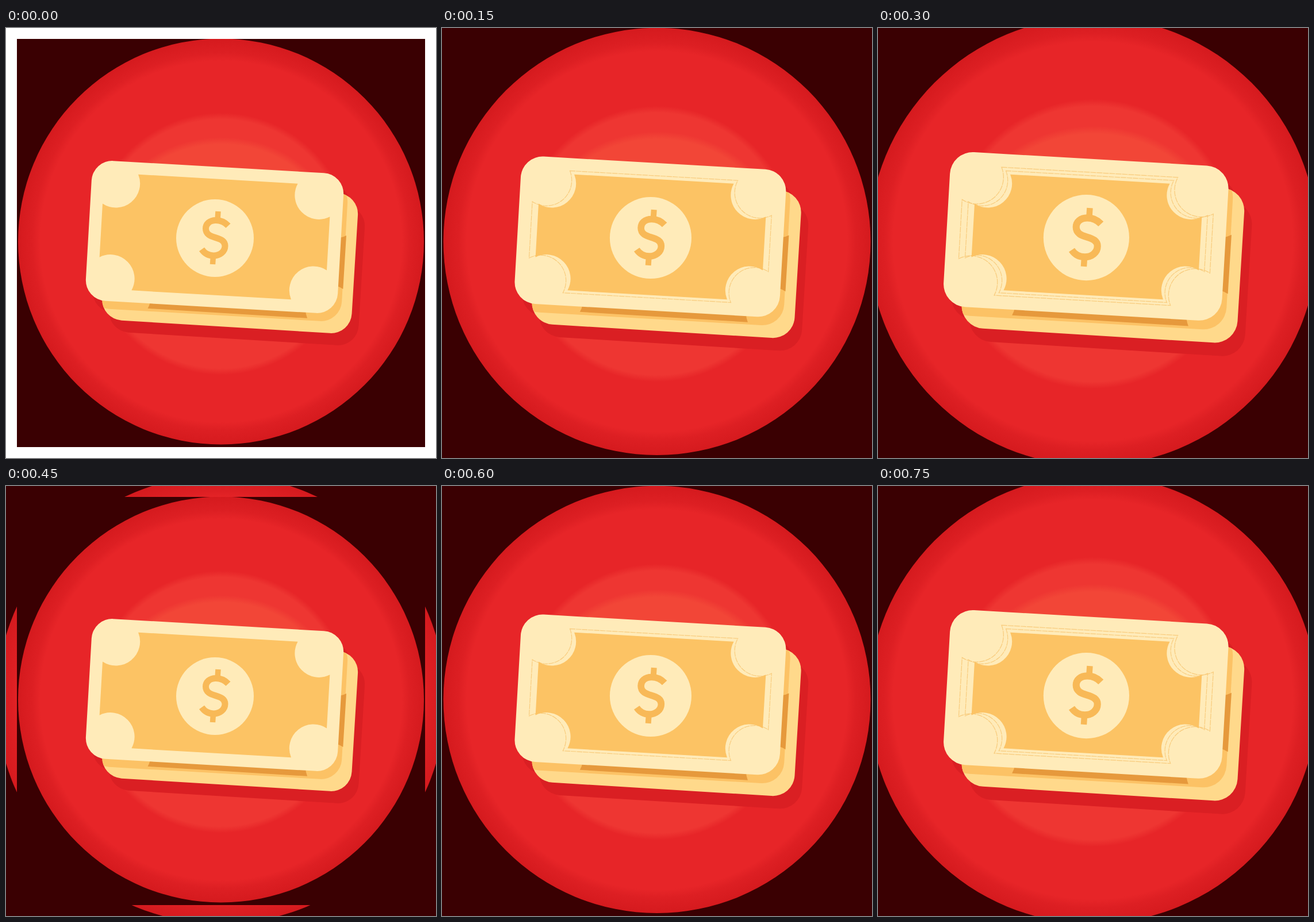
Recreate the animation shown at these times as an HTML page. Size 748 by 748 pixels, loop 0.9 s.

```html
<!DOCTYPE html>
<html lang="en">
<head>
<meta charset="utf-8">
<title>Pulsing banknotes</title>
<style>
  html, body { margin: 0; width: 100%; height: 100%; overflow: hidden; background: #fff; }
  svg { display: block; width: 100vw; height: 100vh; }
</style>
</head>
<body>
<svg viewBox="0 0 748 748">
  <defs>
    <radialGradient id="disc">
      <stop offset=".89" stop-color="#e72528"/>
      <stop offset=".93" stop-color="#dd1f23"/>
      <stop offset="1" stop-color="#d51a1e"/>
    </radialGradient>
    <radialGradient id="ring">
      <stop offset=".95" stop-color="#ee3632"/>
      <stop offset="1" stop-color="#ee3632" stop-opacity="0"/>
    </radialGradient>
    <radialGradient id="glow">
      <stop offset=".93" stop-color="#f24637"/>
      <stop offset="1" stop-color="#f24637" stop-opacity="0"/>
    </radialGradient>

    <rect id="note" x="-219.5" y="-122" width="439" height="244" rx="36"/>
    <rect id="under" x="-217.5" y="-122" width="435" height="244" rx="36"/>
    <path id="panel" d="M-139-101H139A42 42 0 0 0 198-46.6V46.6A42 42 0 0 0 139 101H-139A42 42 0 0 0-198 46.6V-46.6A42 42 0 0 0-139-101Z"/>
    <clipPath id="lower"><use href="#under" transform="translate(389.7 398) rotate(3.5)"/></clipPath>
    <clipPath id="box"><rect x="19" y="19" width="710" height="710"/></clipPath>

    <g id="scene">
      <rect width="748" height="748" fill="#3a0002"/>
      <circle cx="374" cy="371.5" r="353" fill="url(#disc)"/>
      <circle cx="374" cy="375.5" r="228" fill="url(#ring)"/>
      <ellipse cx="375" cy="365" rx="204" ry="175" fill="url(#glow)"/>
      <g fill="#da1f23">
        <use href="#note" transform="translate(375 383.5) rotate(3.3)"/>
        <use href="#under" transform="translate(401.7 419) rotate(3.5)"/>
      </g>
      <use href="#under" transform="translate(389.7 398) rotate(3.5)" fill="#ffd98b"/>
      <g clip-path="url(#lower)">
        <use href="#note" transform="translate(370 377.5) rotate(3.3)" fill="#fcc265"/>
      </g>
      <use href="#panel" transform="translate(391.5 395.5) rotate(3.5)" fill="#e6993c"/>
      <use href="#note" transform="translate(363 363.5) rotate(3.3)" fill="#ffebb9"/>
    </g>

    <use id="face" href="#panel" transform="translate(363 363.5) rotate(3.3)"/>

    <g id="coin">
      <circle cx="363.5" cy="365.5" r="67.5" fill="#ffebb9"/>
      <g fill="none" stroke="#f8b957">
        <path stroke-width="11" d="M386.5 344C380 337 372 334.5 365 334.5C354 334.5 347.5 341 347.5 349C347.5 359 356 362 364 364.5C374 367.5 381 370.5 381 379C381 389 372 396 361 396C352 396 345 391.5 340.5 385"/>
        <path stroke-width="9.5" d="M369 319L368 334M360.5 396L359.5 411"/>
      </g>
    </g>
  </defs>

  <g id="large">
    <use class="zoom" href="#scene"/>
    <g fill="none" stroke="#f8cb7c" stroke-width="1.1" stroke-dasharray="9 1">
      <use id="inner" href="#face"/>
      <use id="outer" href="#face"/>
    </g>
    <use href="#face" fill="#fcc364"/>
    <use class="zoom" href="#coin"/>
  </g>

  <g id="small" clip-path="url(#box)">
    <use href="#scene"/>
    <use href="#face" fill="#fcc364"/>
    <use href="#coin"/>
  </g>
</svg>
<script>
  const STEP = 150, STEPS = 6;
  const SIZES = [0.95, 1, 1.05];
  const $ = id => document.getElementById(id);
  const zoomed = document.querySelectorAll('.zoom');

  const scale = size =>
    `translate(374 374) scale(${size / SIZES[0]}) translate(-374 -374)`;
  const show = (el, on) => el.setAttribute('visibility', on ? 'visible' : 'hidden');

  $('inner').setAttribute('transform', scale(SIZES[1]));
  $('outer').setAttribute('transform', scale(SIZES[2]));

  let last = -1;

  function render(ms) {
    const step = Math.floor(ms / STEP) % STEPS;
    if (step === last) return;
    last = step;
    const phase = step % 3;
    // The small pose covers only its box, so the largest pose shows around it mid-loop.
    const size = SIZES[phase || 2];
    zoomed.forEach(el => el.setAttribute('transform', scale(size)));
    show($('large'), step > 0);
    show($('outer'), step > 0 && phase !== 1);
    show($('small'), phase === 0);
  }

  const start = performance.now();
  function tick() {
    render(performance.now() - start);
    requestAnimationFrame(tick);
  }
  tick();
</script>
</body>
</html>
```
